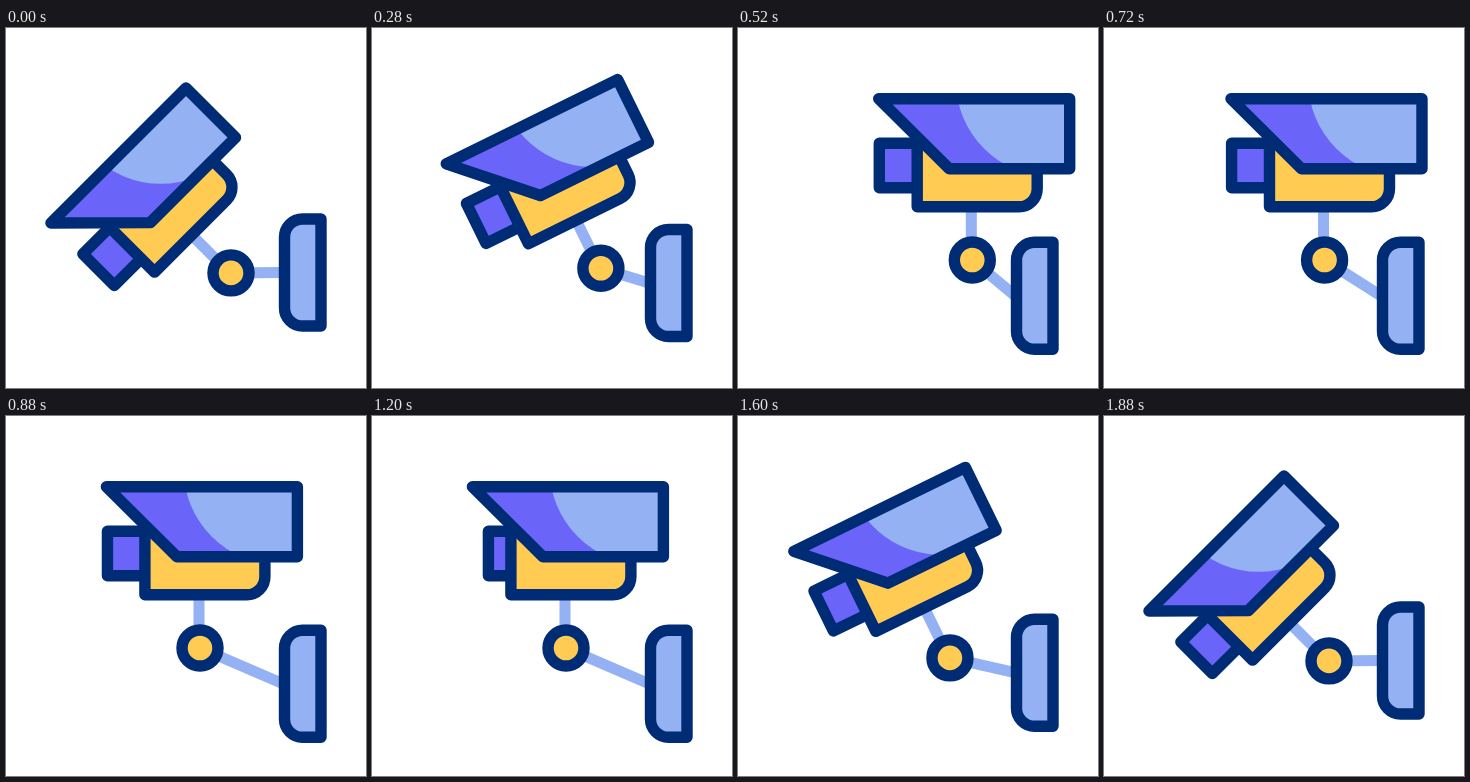
Animation, 360 px wide and 360 px high, one loop 2 s. Source, as an HTML page:

```html
<!DOCTYPE html>
<html lang="en">
<head>
<meta charset="utf-8">
<title>Security camera</title>
<style>
html, body { margin: 0; width: 100%; height: 100%; overflow: hidden; background: #fff; }
svg { display: block; width: 100vw; height: 100vh; }
.ink { stroke: #002b75; stroke-width: 11.4; stroke-linejoin: round; }
.link { stroke: #93b1f3; stroke-width: 11; }
.blue { fill: #93b1f3; }
.violet { fill: #6b64f8; }
.yellow { fill: #ffcb52; }
</style>
</head>
<body>
<svg viewBox="0 0 360 360">
  <clipPath id="hood"><path d="M0 0H191V70H70.5Z"/></clipPath>
  <line id="arm" class="link" x2="277"/>
  <g id="head">
    <line class="link" x1="-1" x2="-1" y2="-60"/>
    <!-- the origin of this group is the tip of the hood -->
    <g id="camera">
      <rect id="lens" class="ink violet" y="44.5" width="50" height="44.5"/>
      <path class="ink yellow" d="M38.5 40V108H140.5A18 18 0 0 0 158.5 90V40Z"/>
      <g clip-path="url(#hood)">
        <rect class="violet" width="191" height="70"/>
        <circle class="blue" cx="173" cy="-18" r="95.8"/>
      </g>
      <path class="ink" fill="none" d="M0 0H191V70H70.5Z"/>
    </g>
  </g>
  <circle id="joint" class="ink yellow" r="18"/>
  <path id="wall" class="ink blue" d="M315 -53.5H296.5A18 18 0 0 0 278.5 -35.5V35.5A18 18 0 0 0 296.5 53.5H315Z"/>
</svg>
<script>
const LOOP = 2000, STEP = 40;
const $ = id => document.getElementById(id);
const mix = (a, b, p) => a + (b - a) * p;
const ramp = (t, from, to) => Math.min(1, Math.max(0, (t - from) / (to - from)));
const place = (id, x, y, angle = 0) =>
  $(id).setAttribute('transform', `translate(${x} ${y}) rotate(${angle})`);

function draw(t) {
  const level = ramp(t, 122, 500), tilt = ramp(t, 1380, 1760);
  const fold = 1 - level + tilt;
  const lift = 1 - level ** 0.91 + tilt ** 1.36;
  const slide = ramp(t, 640, 875);
  const retract = ramp(t, 875, 1125) - ramp(t, 1125, 1375);
  const rise = 2.4 * Math.sin(Math.PI * tilt);

  const wallY = mix(267.8, 244.5, lift);
  const x = mix(mix(234.3, 194, slide), 225, fold);
  const y = wallY + mix(-35.8, 0.4, fold);

  place('wall', 0, wallY);
  place('joint', x, y);
  place('head', x, y, -45 * fold);
  place('camera', mix(-93.6, -92, fold) - rise / 3, mix(-161.2, -162.6, fold) - rise);
  place('lens', 0.6 + 22 * retract, 0);
  $('arm').setAttribute('x1', x);
  $('arm').setAttribute('y1', y);
  $('arm').setAttribute('y2', wallY);
}

const start = performance.now();
function tick() {
  const t = (performance.now() - start) % LOOP;
  draw(Math.floor(t / STEP) * STEP);
  requestAnimationFrame(tick);
}
tick();
</script>
</body>
</html>
```
